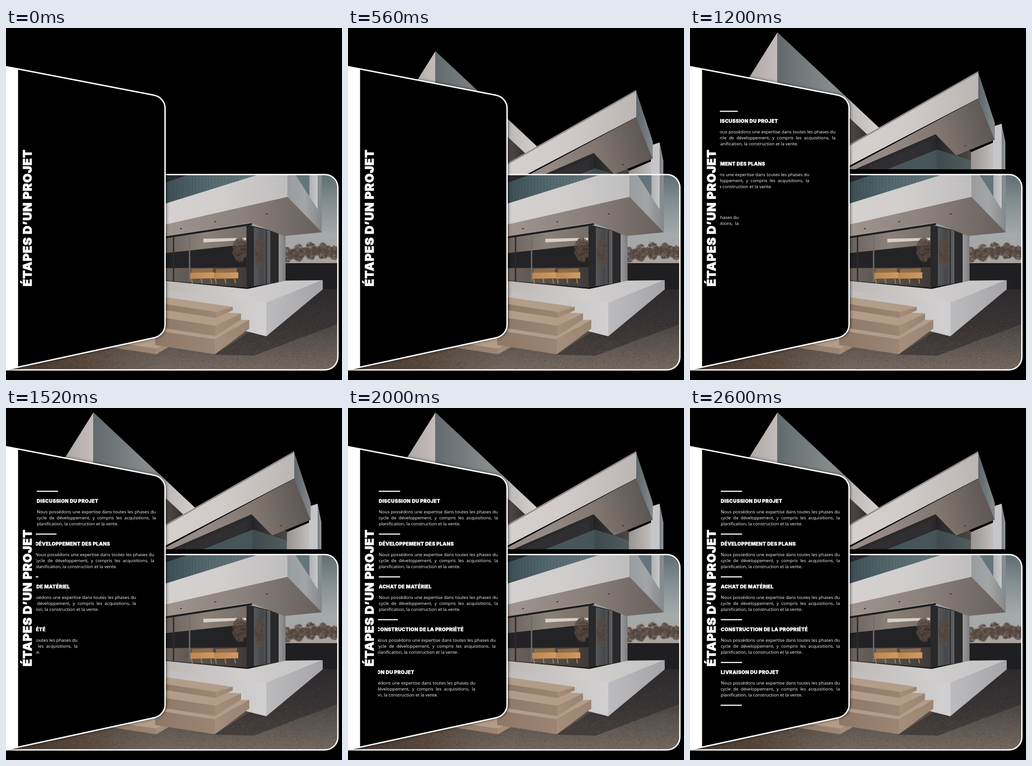
An HTML page with a canvas for the animation above (5600 ms loop, 732x765 px).

```html
<!DOCTYPE html>
<html lang="fr">
<head>
<meta charset="utf-8">
<title>Étapes d’un projet</title>
<style>
html, body { margin: 0; width: 100%; height: 100%; overflow: hidden; background: #000; }
canvas { display: block; width: 732px; height: 765px; }
</style>
</head>
<body>
<canvas id="stage" width="732" height="765"></canvas>
<script>
const W = 732, H = 765, LOOP = 5600, STEP = 40;
const SLIDE = 800, STAGGER = 250, COL = 259.5;
const stage = document.getElementById('stage').getContext('2d');

let seed = 11;
const rnd = () => (seed = (seed * 16807) % 2147483647) / 2147483647;
const mix = (a, b, k) => a + (b - a) * k;

function layer(draw) {
  const c = document.createElement('canvas');
  c.width = W;
  c.height = H;
  draw(c.getContext('2d'));
  return c;
}

function grad(g, x0, y0, x1, y1, colors) {
  const f = g.createLinearGradient(x0, y0, x1, y1);
  colors.forEach((c, i) => f.addColorStop(i / (colors.length - 1), c));
  return f;
}

function poly(g, fill, ...pts) {
  g.beginPath();
  for (let i = 0; i < pts.length; i += 2) g.lineTo(pts[i], pts[i + 1]);
  g.fillStyle = fill;
  g.fill();
}

// upright surface between two vertical edges, shaded from left to right
function wall(g, colors, x0, top0, end0, x1, top1, end1) {
  const shade = [].concat(colors);
  const fill = shade.length > 1 ? grad(g, x0, 0, x1, 0, shade) : shade[0];
  poly(g, fill, x0, top0, x1, top1, x1, end1, x0, end0);
}

function line(g, color, width, x0, y0, x1, y1) {
  g.beginPath();
  g.moveTo(x0, y0);
  g.lineTo(x1, y1);
  g.strokeStyle = color;
  g.lineWidth = width;
  g.stroke();
}

function lamp(g, x, y) {
  g.fillStyle = '#3b3533';
  g.fillRect(x - 2, y - 1, 4, 2);
}

function bush(g, x, y, rx, ry) {
  for (let i = 0; i < rx * ry; i++) {
    const a = rnd() * 6.283, r = Math.sqrt(rnd()), tone = rnd() * 26;
    g.fillStyle = `rgba(${74 + tone},${60 + tone},${52 + tone},.35)`;
    g.beginPath();
    g.arc(x + Math.cos(a) * r * rx, y + Math.sin(a) * r * ry, 2.2, 0, 7);
    g.fill();
  }
}

// upper storey, slides up from behind the card
const roof = layer(g => {
  g.rect(0, 0, W, 307);
  g.clip();
  wall(g, ['#a29e9e', '#c3bcba'], 96, 160, 160, 190.5, 9.5, 160);
  wall(g, ['#626a6d', '#858a8b', '#929394'], 190.5, 9.5, 160, 411, 216, 216);
  wall(g, ['#b8b3b2', '#d3cfcd'], 335, 145, 184, 411, 216, 255);
  wall(g, ['#5e5551', '#35302f'], 335, 184, 260, 384, 230, 232);

  wall(g, ['#8f8a88', '#c9c7c6'], 600, 275, 307, 672, 244, 307);
  wall(g, '#c6c5c7', 660, 214, 307, 679, 208, 307);
  wall(g, ['#757d80', '#979a9c'], 679, 208, 307, 687, 248, 307);
  wall(g, '#2a2a2c', 345, 314, 314, 535, 231, 314);
  wall(g, ['#232325', '#4b4847'], 535, 231, 314, 612, 268, 307);
  for (let x = 392; x < 526; x += 4) line(g, '#3c3a3b', 1.2, x, 307, x, 300 - (x - 390) * 0.42);
  wall(g, 'rgba(88,112,116,.6)', 430, 307, 307, 538, 264, 307);
  wall(g, 'rgba(88,112,116,.5)', 538, 264, 307, 612, 288, 307);

  const soffit = grad(g, 440, 270, 650, 210, ['#948985', '#81776f', '#5e5754']);
  poly(g, soffit, 629, 153, 664, 243, 580, 277, 535, 231, 360, 307, 340, 307);
  wall(g, ['#5c656a', '#858a8c'], 627, 94, 153, 664, 206, 244);
  wall(g, ['#d6d1cf', '#cfcac8', '#bbb6b4'], 340, 257, 303, 628, 94, 153);
  line(g, '#8d8987', 3, 340, 259, 627, 96);
  lamp(g, 599, 256);
});

function sky(g) {
  g.fillStyle = grad(g, 0, 318, 0, 515, ['#5f6e73', '#859092', '#a5aaab', '#a8a29d']);
  g.fillRect(0, 310, W, 210);
  for (let x = 612; x < W; x += 13) bush(g, x, 490 + 6 * Math.sin(x), 12, 14 + 5 * Math.cos(x * 0.7));
  g.fillStyle = '#1f1e20';
  g.fillRect(600, 511, W, 70);
}

function ground(g) {
  g.fillStyle = grad(g, 0, 568, 0, 745, ['#363336', '#4f4946', '#74695f']);
  g.fillRect(0, 568, W, 180);
  g.fillStyle = grad(g, 0, 0, 340, 0, ['#42352c', '#58473b', 'rgba(92,80,72,0)']);
  g.fillRect(0, 640, 340, 110);
  poly(g, 'rgba(38,34,36,.5)', 453, 710, 690, 560, W, 572, W, 640, 540, 712);
  for (let i = 0; i < 7000; i++) {
    g.fillStyle = rnd() < 0.5 ? 'rgba(20,17,17,.2)' : 'rgba(175,160,150,.18)';
    g.fillRect(rnd() * W, 570 + 175 * Math.sqrt(rnd()), 1 + rnd() * 1.6, 1);
  }
}

function room(g) {
  wall(g, '#232325', 340, 455, 550, 528, 427, 566);
  wall(g, ['#665e59', '#8b8178', '#766d66'], 340, 458, 490, 525, 430, 470);
  wall(g, '#d9cfc3', 430, 458, 466, 523, 456, 461);
  wall(g, ['#6f665f', '#3f3a38'], 340, 522, 548, 525, 520, 564);
  bush(g, 510, 482, 16, 26);
  for (const x of [401, 453]) {
    wall(g, '#8f6b48', x + 4, 524, 534, x + 50, 522, 532);
    wall(g, ['#bd8750', '#d09a60'], x, 532, 545, x + 53, 531, 544);
    for (const leg of [3, 24, 45]) line(g, '#b6824e', 2, x + leg, 545, x + leg + 2, 555);
  }
  for (const x of [365, 400]) line(g, x < 400 ? '#2c2b2c' : '#6f6c6a', 3, x, 453, x, 551);
  line(g, '#1d1d1f', 4, 340, 456, 536, 426);

  wall(g, '#29282a', 524, 427, 565, 594, 444, 553);
  wall(g, ['#56585a', '#46474a', '#606263'], 540, 433, 561, 576, 441, 555);
  bush(g, 553, 487, 11, 30);
  line(g, '#28282a', 2, 567, 440, 567, 557);
  wall(g, ['#9a9999', '#7d7d80'], 594, 445, 553, 609, 449, 551);
}

function terrace(g) {
  const floor = grad(g, 348, 0, 680, 0, ['#bcb8b6', '#d0cecd', '#c4c3c3']);
  poly(g, floor, 330, 548, 526, 567, 610, 549, 690, 548, 566, 598, 330, 569);
  wall(g, ['#bfbcbb', '#d1cfcf'], 330, 568, 610, 567, 597, 670);
  wall(g, ['#bcbcbf', '#a5a5a9'], 567, 597, 670, 690, 548, 568);
}

function step(g, x, y, w, rise, h) {
  poly(g, '#b39d89', x - 130, y - 35, x + w, y - rise, x, y, x - 130, y - 18);
  wall(g, ['#8d7767', '#9c8573'], x - 130, y - 20, y - 20 + h, x, y, y + h);
  wall(g, ['#a58e7b', '#9a8472'], x, y, y + h, x + w, y - rise, y - rise + h * 0.6);
}

function stairs(g) {
  step(g, 327, 697, 46, 21, 12);
  for (let i = 2; i >= 0; i--) step(g, 457 - i, 617 + 30 * i, 37 + 19 * i, 11 + 16 * i, 13 + 9.5 * i);
}

function overhang(g) {
  wall(g, ['#a6a9aa', '#c7c8c9'], 655, 315, 390, 679, 315, 405);
  wall(g, '#858c8f', 679, 315, 402, 688, 315, 410);
  wall(g, ['#394a4f', '#566a6f', '#65777b'], 330, 315, 390, 560, 315, 325);
  for (let x = 350; x < 530; x += 7) line(g, 'rgba(30,45,50,.2)', 1, x, 318, x, 382 - (x - 348) * 0.32);
  wall(g, '#27282b', 330, 315, 342, 408, 315, 315);
  wall(g, '#64757a', 613, 315, 367, 661, 315, 367);
  wall(g, ['#999d9f', '#a3a5a6', '#858688'], 613, 292, 367, 688, 408, 444);
  const soffit = grad(g, 348, 430, 680, 440, ['#a0958e', '#8b817b', '#67605d']);
  poly(g, soffit, 330, 430, 613, 367, 688, 444, 606, 452, 532, 423, 330, 455);
  wall(g, ['#d5d2d1', '#d0cecd', '#bfbebe'], 330, 387, 431, 613, 299, 367);
  lamp(g, 568, 404);
  lamp(g, 456, 421);
  lamp(g, 381, 436);
}

function outline(g) {
  g.strokeStyle = '#fff';
  g.lineWidth = 3;
  g.stroke();
}

const card = layer(g => {
  const shape = new Path2D();
  shape.roundRect(-60, 318.5, 783, 424.5, 28);
  g.save();
  g.clip(shape);
  [sky, ground, room, terrace, stairs, overhang].forEach(part => part(g));
  g.restore();
  g.strokeStyle = '#fff';
  g.lineWidth = 3;
  g.stroke(shape);
});

// extra-bold lettering
function heavy(g, text, x, y, size) {
  g.font = `900 ${size}px Inter, "Open Sans", sans-serif`;
  g.letterSpacing = size * 0.031 + 'px';
  g.fillStyle = g.strokeStyle = '#fff';
  g.lineWidth = size * 0.03;
  g.fillText(text, x, y);
  g.strokeText(text, x, y);
  g.letterSpacing = '0px';
}

const panel = layer(g => {
  const shape = new Path2D();
  shape.moveTo(-10, 82);
  shape.lineTo(320, 145.5);
  shape.bezierCurveTo(336, 148, 346.5, 160, 346.5, 174);
  shape.lineTo(346.5, 645);
  shape.bezierCurveTo(346.5, 659, 336, 671, 321, 673.5);
  shape.lineTo(-10, 745);
  shape.closePath();
  g.save();
  g.shadowColor = 'rgba(0,0,0,.75)';
  g.shadowBlur = 7;
  g.shadowOffsetX = 2;
  g.fill(shape);
  g.restore();
  g.save();
  g.clip(shape);
  g.fillStyle = '#fff';
  g.fillRect(0, 0, 26.3, H);
  g.restore();
  g.strokeStyle = '#fff';
  g.lineWidth = 3;
  g.stroke(shape);
  g.translate(56.3, 561.5);
  g.rotate(-Math.PI / 2);
  heavy(g, 'ÉTAPES D’UN PROJET', 0, 0, 26);
});

const titles = ['DISCUSSION DU PROJET', 'DÉVELOPPEMENT DES PLANS', 'ACHAT DE MATÉRIEL',
  'CONSTRUCTION DE LA PROPRIÉTÉ', 'LIVRAISON DU PROJET', ''];
const body = ['Nous possédons une expertise dans toutes les phases du',
  'cycle de développement, y compris les acquisitions, la',
  'planification, la construction et la vente.'];

function justify(g, text, x, y) {
  const words = text.split(' ');
  const widths = words.map(w => g.measureText(w).width);
  const gap = (COL - widths.reduce((a, b) => a + b)) / (words.length - 1);
  words.forEach((w, i) => {
    g.fillText(w, x, y);
    x += widths[i] + gap;
  });
}

function block(g, title, x, y) {
  g.fillStyle = '#fff';
  g.fillRect(x, y, 46.5, 2.4);
  if (!title) return;
  heavy(g, title, x, y + 26, 10.5);
  g.font = '9.65px "Open Sans", "Noto Sans", sans-serif';
  justify(g, body[0], x, y + 49.2);
  justify(g, body[1], x, y + 62.2);
  g.fillText(body[2], x, y + 75.2);
}

// cubic-bezier(.25, .1, .25, 1)
function ease(p) {
  if (p <= 0) return 0;
  if (p >= 1) return 1;
  const bez = (a, b, s) => 3 * a * s * (1 - s) ** 2 + 3 * b * s * s * (1 - s) + s ** 3;
  let lo = 0, hi = 1;
  for (let i = 0; i < 24; i++) {
    const mid = (lo + hi) / 2;
    if (bez(0.25, 0.25, mid) < p) lo = mid; else hi = mid;
  }
  return bez(0.1, 1, lo);
}

const remaining = (t, start, travel) => mix(travel, 0, ease((t - start) / SLIDE));

function draw(t) {
  const g = stage;
  g.fillStyle = '#000';
  g.fillRect(0, 0, W, H);
  g.drawImage(roof, 0, remaining(t, 130, 250));
  g.drawImage(card, 0, 0);
  g.drawImage(panel, 0, 0);
  g.save();
  g.beginPath();
  g.rect(65, 150, 280, 520);
  g.clip();
  titles.forEach((title, i) => {
    const off = remaining(t, 592 + STAGGER * i, 261);
    if (off < 261) block(g, title, 67 - off, 179.8 + 93 * i);
  });
  g.restore();
}

const t0 = performance.now();
function tick() {
  const t = (performance.now() - t0) % LOOP;
  draw(Math.floor(t / STEP) * STEP);
  requestAnimationFrame(tick);
}
tick();
</script>
</body>
</html>
```
